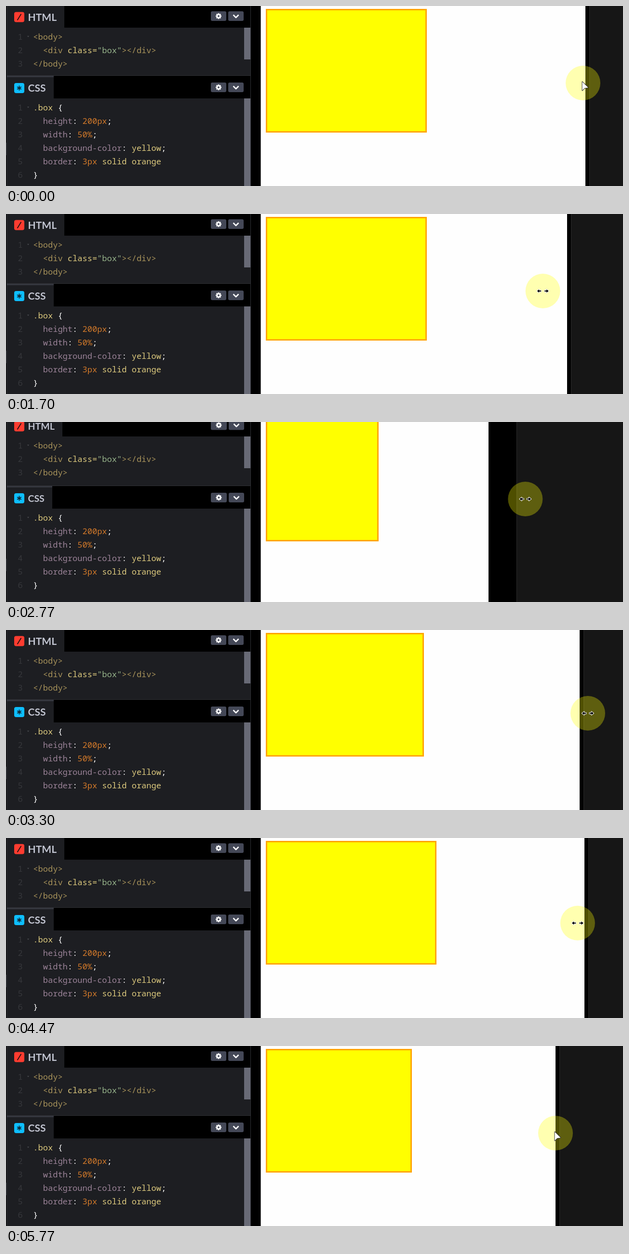
These frames come from a looping animation (1280x374 px, 5.81 s). An HTML page with a canvas:

```html
<!DOCTYPE html>
<html lang="en">
<head>
<meta charset="utf-8">
<title>Percentage width</title>
<style>
html, body { margin: 0; width: 100%; height: 100%; overflow: hidden; background: #000; }
canvas { display: block; }
</style>
</head>
<body>
<canvas id="stage" width="1280" height="374"></canvas>
<script>
const ctx = document.getElementById('stage').getContext('2d');
const LOOP = 5810;
const BREAKPOINT = 1100;
const FRAME_LAG = 36, LAYOUT_LAG = 114;
const GRAB = 250, RELEASE = 5070;

// Pointer strokes: start, end, x reached
const moves = [
  [0, 250, 1206], [1640, 1700, 1114], [1700, 2170, 981], [2170, 2300, 968],
  [2600, 2770, 1077], [2770, 3100, 1194], [3264, 3300, 1207], [3640, 4000, 1248],
  [4350, 4470, 1186], [4470, 4800, 1150], [4800, 5070, 1144], [5230, 5770, 1140]
];

const clamp = (v, lo, hi) => Math.min(hi, Math.max(lo, v));
const ramp = (t, a, b) => clamp((t - a) / (b - a), 0, 1);
const pointerX = t => moves.reduce((x, [a, b, to]) => x + (to - x) * ramp(t, a, b), 1197);
const pointerY = t => 160 + 13 * ramp(t, 2770, 3300) + 8 * ramp(t, 3300, 5770);
const pageEdge = t => pointerX(clamp(t, GRAB, RELEASE)) - 4;

const PANEL = '#1d1e22', LINE = '#303136', BUTTON = '#444857';
const TAG = '#a7925a', ATTR = '#ddca7e', STR = '#96b38a', PROP = '#9a8297', NUM = '#d0782a', WHITE = '#fff';

const rule = (name, ...value) => [['  ' + name, PROP], [': ', WHITE], ...value];
const html = [
  [['<body>', TAG]],
  [['  <div ', TAG], ['class=', ATTR], ['"box"', STR], ['></div>', TAG]],
  [['</body>', TAG]]
];
const css = [
  [['.box ', ATTR], ['{', WHITE]],
  rule('height', ['200px', NUM], [';', WHITE]),
  rule('width', ['50%', NUM], [';', WHITE]),
  rule('background-color', ['yellow', ATTR], [';', WHITE]),
  rule('border', ['3px', NUM], [' solid orange', ATTR]),
  [['}', WHITE]]
];

function rect(x, y, w, h, fill) {
  ctx.fillStyle = fill;
  ctx.fillRect(x, y, w, h);
}

function rounded(x, y, w, h, r, fill) {
  ctx.fillStyle = fill;
  ctx.beginPath();
  ctx.roundRect(x, y, w, h, r);
  ctx.fill();
}

function circle(x, y, r, fill) {
  ctx.fillStyle = fill;
  ctx.beginPath();
  ctx.arc(x, y, r, 0, 7);
  ctx.fill();
}

function stroke(points, width, color) {
  ctx.lineWidth = width;
  ctx.strokeStyle = color;
  ctx.beginPath();
  points.forEach(([x, y]) => ctx.lineTo(x, y));
  ctx.stroke();
}

function polygon(points, fill, line) {
  ctx.beginPath();
  points.forEach(([x, y]) => ctx.lineTo(x, y));
  ctx.closePath();
  ctx.lineJoin = 'round';
  ctx.lineWidth = 2;
  ctx.strokeStyle = line;
  ctx.stroke();
  ctx.fillStyle = fill;
  ctx.fill();
}

// Crossed bars through one centre
function star(x, y, r, bars, width, color) {
  for (let k = 0; k < bars; k++) {
    const a = Math.PI * (.5 + k / bars);
    const dx = Math.cos(a) * r, dy = Math.sin(a) * r;
    stroke([[x - dx, y - dy], [x + dx, y + dy]], width, color);
  }
}

function text(s, x, y, color, font) {
  ctx.font = font;
  ctx.fillStyle = color;
  ctx.fillText(s, x, y);
}

function code(lines, y) {
  const font = '17.05px "Noto Sans Mono", monospace';
  lines.forEach((line, i) => {
    const base = y + i * 28;
    text(i + 1, 24.5, base, '#36373b', font);
    let x = 56.3;
    for (const [s, color] of line) {
      text(s, x, base, color, font);
      x += ctx.measureText(s).width;
    }
  });
  polygon([[44, y - 8], [48, y - 8], [46, y - 5]], '#47484c', 'transparent');
}

function buttons(y, shift) {
  rounded(425, y, 32 + shift, 20, 3, BUTTON);
  rounded(461 + shift, y, 32, 20, 3, BUTTON);
  const gear = 441 + shift / 2, chevron = 477 + shift, mid = y + 10;
  star(gear, mid, 6, 4, 2.6, WHITE);
  circle(gear, mid, 4.6, WHITE);
  circle(gear, mid, 1.9, BUTTON);
  stroke([[chevron - 5.5, mid - 2.5], [chevron, mid + 3], [chevron + 5.5, mid - 2.5]], 2.6, WHITE);
}

function heading(label, y, small, color) {
  rounded(17, y - 10.5, 21, 21, 4, color);
  if (label === 'HTML') stroke([[23.5, y + 6.5], [31.5, y - 6.5]], 1.8, '#1a1010');
  else star(27.5, y, 5, 3, 1.8, '#10202a');
  text(label, 45.5, y + (small ? 7 : 7.5), '#c0c3cf', `700 ${small ? 19.5 : 21}px Lato, sans-serif`);
}

function editor(small) {
  const codeTop = small ? 30 : 45, cssTop = small ? 133 : 145, cssCode = cssTop + 47;
  const cssTab = small ? 95 : 98;
  rect(1, 0, small ? 116 : 120, codeTop, PANEL);
  rect(1, codeTop, 507, cssTop - codeTop, PANEL);
  rect(1, cssTop, cssTab, 47, PANEL);
  rect(1, cssCode, 507, 374 - cssCode, PANEL);

  rect(1, cssTop - 1, 507, 1, LINE);
  rect(1, cssTop, cssTab, 3, '#34363e');
  rect(1, 0, 1, 374, LINE);
  rect(0, 284, 2, 26, LINE);
  rect(507, 0, 1, 374, LINE);
  rect(494, codeTop, 13, 66, '#686a76');
  rect(494, cssCode, 13, 374 - cssCode, '#686a76');

  heading('HTML', small ? 9 : 23, small, '#ff3c30');
  heading('CSS', small ? 158.5 : 170.5, small, '#0ebeff');
  buttons(small ? -3.5 : 11, small ? 1 : 0);
  buttons(small ? 147 : 159, small ? 1 : 0);
  code(html, small ? 55 : 70);
  code(css, small ? 205 : 217);
}

function preview(edge, layout, small) {
  const y = small ? -9 : 6, w = Math.round((layout - 548) / 2 + 7.4);
  ctx.save();
  ctx.beginPath();
  ctx.rect(528.5, 0, Math.round(edge) - 528.5, 374);
  ctx.clip();
  rect(528, 0, 752, 374, '#fefefe');
  rect(539, y, w, 257, '#ffa500');
  rect(542, y + 3, w - 6, 251, '#ffff00');
  ctx.restore();
}

function desktop(x) {
  rect(x, 0, 1280 - x, 374, '#161616');
  rect(x, 0, 1, 374, '#2a2a2a');
}

function pointer(x, y, resizing) {
  circle(x, y, 36, 'rgba(255,255,0,.31)');
  ctx.save();
  ctx.translate(x, y);
  if (resizing) {
    const half = [[-12, 0], [-7.5, -3.5], [-7.5, -1], [-3.5, -1], [-3.5, 1], [-7.5, 1], [-7.5, 3.5]];
    polygon(half, '#000', WHITE);
    polygon(half.map(([px, py]) => [-px, py]), '#000', WHITE);
  } else {
    ctx.translate(-1.5, -2.5);
    polygon([[0, 0], [0, 18], [4.8, 13], [12, 12]], WHITE, '#333');
  }
  ctx.restore();
}

function draw(t) {
  // The frame follows the pointer; the page inside lays out a little later.
  const frame = pageEdge(t - FRAME_LAG), layout = pageEdge(t - LAYOUT_LAG);
  const small = layout + 8 < BREAKPOINT;
  rect(0, 0, 1280, 374, '#000');
  editor(small);
  preview(Math.min(frame, layout), layout, small);
  desktop(Math.round(frame + 8));
  pointer(pointerX(t), pointerY(t), t > GRAB && t < 5230);
}

function tick() {
  draw(performance.now() % LOOP);
  requestAnimationFrame(tick);
}
tick();
</script>
</body>
</html>
```
